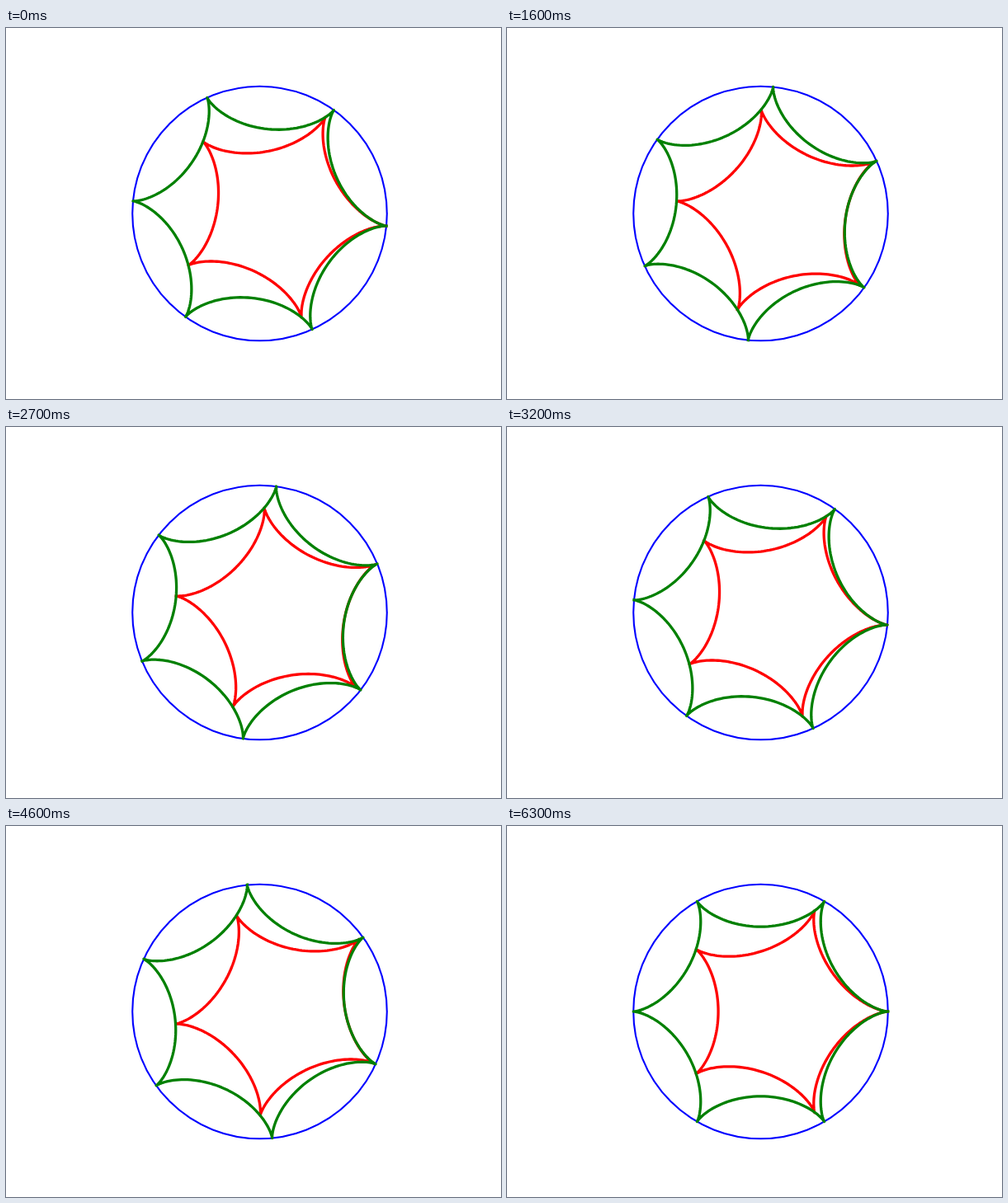
An HTML page with a canvas for the animation above (6.4 s loop, 600 by 450 pixels).

```html
<!DOCTYPE html>
<html lang="en">
<head>
<meta charset="utf-8">
<title>Rolling hypocycloids</title>
<style>
  html, body { margin: 0; height: 100%; overflow: hidden; background: #fff; }
  canvas { display: block; }
</style>
</head>
<body>
<canvas id="stage" width="600" height="450"></canvas>
<script>
const ctx = document.getElementById('stage').getContext('2d');
const UNIT = 360 / 14, CX = 307.5, CY = 225;
const STEPS = 64, STEP_MS = 100, TAU = 2 * Math.PI;

// Hypocycloid with n cusps, traced by a unit circle rolling inside radius n
function hypocycloid(n, cx, turn, color) {
  const samples = 360, cos = Math.cos(turn), sin = Math.sin(turn);
  ctx.beginPath();
  for (let i = 0; i <= samples; i++) {
    const a = TAU * i / samples;
    const x = (n - 1) * Math.cos(a) + Math.cos((n - 1) * a);
    const y = (n - 1) * Math.sin(a) - Math.sin((n - 1) * a);
    ctx.lineTo(cx + UNIT * (x * cos - y * sin), CY + UNIT * (x * sin + y * cos));
  }
  ctx.strokeStyle = color;
  ctx.lineWidth = 3.3;
  ctx.stroke();
}

function draw() {
  const step = Math.floor(performance.now() / STEP_MS) % STEPS + 1;
  const turn = TAU * step / STEPS;
  ctx.fillStyle = '#fff';
  ctx.fillRect(0, 0, 600, 450);

  ctx.lineCap = 'square';
  ctx.lineJoin = 'round';
  ctx.beginPath();
  ctx.arc(CX, CY, 6 * UNIT, 0, TAU);
  ctx.strokeStyle = '#00f';
  ctx.lineWidth = 2.08;
  ctx.stroke();

  hypocycloid(5, CX + UNIT, turn * 6 / 5, '#f00');
  hypocycloid(6, CX, turn, '#008000');
  requestAnimationFrame(draw);
}
draw();
</script>
</body>
</html>
```
